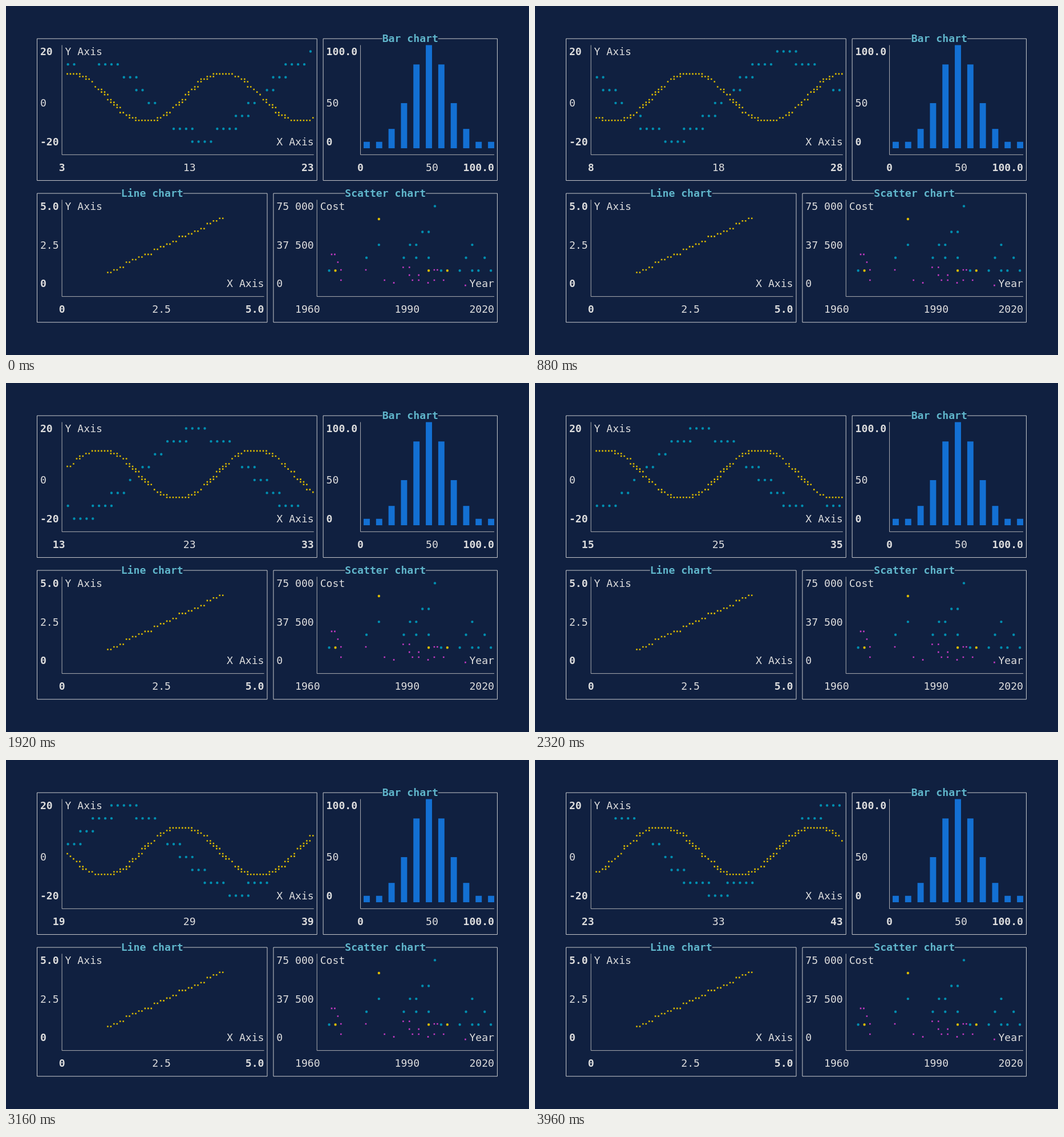
An HTML page for the animation above (4.08 s loop, 917 by 611 pixels).

```html
<!DOCTYPE html>
<html lang="en">
<head>
<meta charset="utf-8">
<title>Charts</title>
<style>
  html, body { margin: 0; width: 100%; height: 100%; overflow: hidden; background: #102040; }
  svg { display: block; }
  text { font: 18.114px "DejaVu Sans Mono", monospace; fill: #ddd; white-space: pre; }
  .bold { font-weight: 700; }
  .title { font-weight: 700; fill: #60b6cb; }
  .border { stroke: #ddd; stroke-width: 0.9; fill: none; }
  .axis { stroke: #bebebe; stroke-width: 0.9; fill: none; }
</style>
</head>
<body>
<svg id="stage" width="917" height="611" viewBox="0 0 917 611"></svg>
<script>
const stage = document.getElementById('stage');
const CW = 10.905, CH = 22.57, LOOP = 4080;
const YELLOW = '#dbba00', CYAN = '#008eb0', MAGENTA = '#c43ac3', BLUE = '#1370d3';

// Centre of a terminal cell, left edge of a column
const cx = c => 54.5 + c * CW;
const cy = r => 57.2 + r * CH;
const edge = c => cx(c - 0.5);

function add(tag, attrs, content = '') {
  const el = document.createElementNS('http://www.w3.org/2000/svg', tag);
  for (const k in attrs) el.setAttribute(k, attrs[k]);
  el.textContent = content;
  return stage.appendChild(el);
}
const label = (c, r, str, cls = '') => add('text', { x: edge(c), y: cy(r) + 6.2, class: cls }, str);

// Path pieces: a round bullet in a cell, a braille dot on the 2x4 sub-grid
function bullet(c, r) {
  const R = 2.2;
  return `M${cx(c) - 0.4 - R} ${cy(r) - 0.2}a${R} ${R} 0 1 0 ${2 * R} 0a${R} ${R} 0 1 0 ${-2 * R} 0z`;
}
function braille(col, row, sx, sy) {
  const x = cx(col + (sx >> 1)) - 1.5 + (sx & 1) * CW / 2;
  const y = cy(row + (sy >> 2)) - 6 + (sy & 3) * 4.55;
  return `M${x - 1.3} ${y - 1.3}h2.6v2.6h-2.6z`;
}

// Bordered chart; axes, titles and tick labels are placed from its cell box
function chart({ box: [c0, r0, c1, r1], title = '', yTicks, xTicks, ends = 'bold', yName = '', xName = '' }) {
  const left = c0 + 2 + Math.max(...yTicks.map(s => s.length));
  const top = r0 + 1, base = r1 - 2, width = c1 - left;
  const tc = c0 + 1 + Math.floor((c1 - c0 - 1 - title.length) / 2);
  add('path', {
    class: 'border',
    d: `M${edge(tc)} ${cy(r0)}H${cx(c0)}V${cy(r1)}H${cx(c1)}V${cy(r0)}H${edge(tc + title.length)}`
  });
  add('path', { class: 'axis', d: `M${cx(left - 1)} ${cy(top - 0.5)}V${cy(base)}H${edge(c1)}` });
  label(tc, r0, title, 'title');
  label(left, top, yName);
  label(c1 - xName.length, base - 1, xName);

  const weight = i => i === 1 ? '' : ends;
  yTicks.forEach((s, i) => label(c0 + 1, base - 1 - Math.floor(i * (base - 1 - top) / 2), s, weight(i)));
  const marks = xTicks.map((s, i) => label(left, base + 1, s, weight(i)));
  function setX(ticks) {
    ticks.map(String).forEach((s, i) => {
      const middle = left + Math.round(width / 2) - Math.ceil(s.length / 2);
      marks[i].setAttribute('x', edge([left - s.length, middle, c1 - s.length][i]));
      marks[i].textContent = s;
    });
  }
  setX(xTicks);
  return { left, top, base, setX };
}

const live = chart({
  box: [0, 0, 45, 11], yTicks: ['-20', '0', '20'], xTicks: [0, 10, 20], yName: 'Y Axis', xName: 'X Axis'
});
const bars = chart({
  box: [46, 0, 74, 11], title: 'Bar chart', yTicks: ['0', '50', '100.0'], xTicks: ['0', '50', '100.0']
});
const slope = chart({
  box: [0, 12, 37, 22], title: 'Line chart', yTicks: ['0', '2.5', '5.0'], xTicks: ['0', '2.5', '5.0'],
  yName: 'Y Axis', xName: 'X Axis'
});
const scatter = chart({
  box: [38, 12, 74, 22], title: 'Scatter chart', yTicks: ['0', '37 500', '75 000'],
  xTicks: ['1960', '1990', '2020'], ends: '', yName: 'Cost', xName: 'Year'
});

// Bell curve, heights rounded up to half rows
for (let i = -5; i <= 5; i++) {
  const h = Math.ceil(16 * Math.exp(-i * i / 4.6));
  add('rect', {
    x: edge(bars.left + 10 + 2 * i), y: cy(bars.base - 0.5 - h / 2), width: CW, height: h * CH / 2, fill: BLUE
  });
}

// Straight line on the braille grid
let d = '';
for (let i = 0; i <= 37; i++) d += braille(slope.left, slope.top, 13 + i, 22 - Math.floor((i * 17 + 18) / 37));
add('path', { d, fill: YELLOW });

// Scatter series: row -> columns
function series(rows, dot, fill) {
  const d = Object.entries(rows).flatMap(([r, cols]) => cols.map(c => dot(c, +r))).join('');
  add('path', { d, fill });
}
const big = (c, r) => bullet(scatter.left + c, scatter.top + r);
const small = (c, r) => braille(scatter.left, scatter.top, c, r);
series({
  0: [18], 2: [16, 17], 3: [9, 14, 15, 24], 4: [7, 13, 15, 17, 23, 26], 5: [1, 19, 22, 24, 25, 27]
}, big, CYAN);
series({ 1: [9], 5: [2, 17, 20] }, big, YELLOW);
series({
  16: [3, 4], 19: [5], 20: [26, 28], 21: [6, 14, 36, 37], 23: [28, 31],
  24: [6, 20, 29, 31, 36, 39], 25: [23, 34], 26: [46]
}, small, MAGENTA);

// Scrolling waves
function signal(step, period, scale, count) {
  const pts = [];
  for (let i = 0, x = 0; i < count; i++, x += step) pts.push([x, Math.sin(x / period) * scale]);
  return pts;
}
const wave = signal(0.2, 3, 18, 320);
const fine = signal(0.1, 2, 10, 440);
const wavePath = add('path', { fill: CYAN });
const finePath = add('path', { fill: YELLOW });

// Distinct grid points of a signal inside the window starting at w
function plot(pts, w, cols, rows) {
  const hits = new Map();
  for (const [x, y] of pts) {
    if (x < w || x > w + 20) continue;
    const gx = Math.round((x - w) * (cols - 1) / 20);
    const gy = Math.round((20 - y) * (rows - 1) / 40);
    hits.set(gx + ',' + gy, [gx, gy]);
  }
  return [...hits.values()];
}

function draw(w) {
  // Cells already used by axis names and by the fine wave hide bullets
  const taken = new Set();
  for (let i = 0; i < 6; i++) taken.add(i + ',0').add(34 + i + ',7');
  let d = '';
  for (const [x, y] of plot(fine.slice(10 * w, 10 * w + 200), w, 80, 32)) {
    taken.add((x >> 1) + ',' + (y >> 2));
    d += braille(live.left, live.top, x, y);
  }
  finePath.setAttribute('d', d);
  wavePath.setAttribute('d', plot(wave.slice(5 * w), w, 40, 8)
    .filter(([x, y]) => !taken.has(x + ',' + y))
    .map(([x, y]) => bullet(live.left + x, live.top + y)).join(''));
  live.setX([w, w + 10, w + 20]);
}

// One step every 200 ms, a few of them late or early
const jitter = { 5: 40, 6: -40, 9: 40, 12: 40 };
const ticks = [];
for (let i = 0, t = 80; i < 20; i++) {
  if (i) t += 200 + (jitter[i] || 0);
  ticks.push(t);
}

let shown = -1;
function update() {
  const t = performance.now() % LOOP;
  const w = 3 + ticks.filter(k => t >= k).length;
  if (w !== shown) draw(shown = w);
  requestAnimationFrame(update);
}
update();
</script>
</body>
</html>
```
